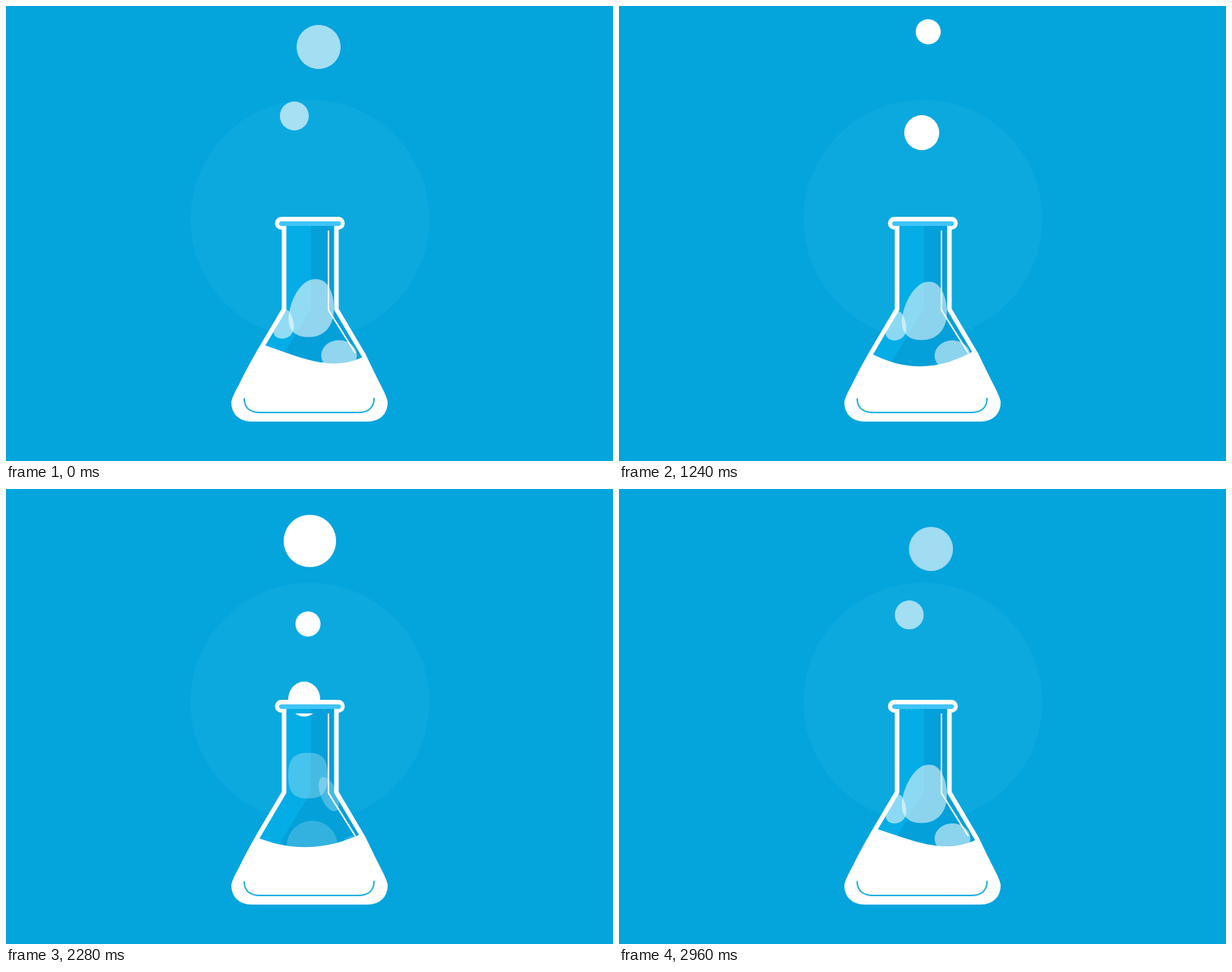
Animation, 800 px wide and 600 px high, one loop 3000 ms. Source, as an HTML page with a canvas:

```html
<!DOCTYPE html>
<html lang="en">
<head>
<meta charset="utf-8">
<title>Bubbling flask</title>
<style>
html, body { margin: 0; width: 100%; height: 100%; overflow: hidden; background: #04a4dd; }
canvas { display: block; }
</style>
</head>
<body>
<canvas id="stage" width="800" height="600"></canvas>
<script>
const ctx = document.getElementById('stage').getContext('2d');
const LOOP = 3000, STEP = 40;
const BLUE = '#04a4dd', LIGHT = '#04ade6', SHADE = '#04a0d9';

const flask = new Path2D('M366.5 290V400L334 455Q318 483 310 500Q300 518 300 523C300 537 310 545 323 545H477C490 545 500 537 500 523Q500 518 490 499Q482 483 471 460L435.5 400V290');
const facet = new Path2D('M366 290H402V400L360 468H325L366 400Z');
const shine = new Path2D('M425 296V401L460 457');
const baseLine = new Path2D('M314 518C314 530 322 536 335 536H464C477 536 485 530 485 517.5');
const bubbleArea = new Path2D('M0 0H800V290H0Z');
bubbleArea.addPath(flask);

// One pose of a bubble at time p
const pose = (p, x, y, rx, ry = rx, taper = 0, lean = 0, square = 2) =>
  [p, x, y, rx, ry, taper, lean, square];

const big = [
  pose(-1080, 403, 510, 33),
  pose(-680, 403.5, 471, 33.5),
  pose(-200, 405, 411, 26.5, 40, .38, 4),
  pose(0, 403.5, 402, 28.5, 38.5, .2, 5, 2.2),
  pose(600, 401, 278.5, 30, 35.5, 0, 0, 2.6),
  pose(1040, 400.5, 68.5, 34.5),
  pose(1220, 400, -40, 34.5)
];
const small = [
  pose(-680, 362, 487, 14),
  pose(-200, 363.5, 433.5, 13.5, 17.5, .35, 2),
  pose(0, 366, 422, 12.5, 19, .4, 3),
  pose(600, 385, 364.5, 14.2, 18.5, -.12, 0, 2.4),
  pose(1040, 398, 178, 16.5),
  pose(1280, 407.5, 34, 16.5),
  pose(1400, 412, -40, 16.5)
];
const medium = [
  pose(-1080, 458, 500, 18),
  pose(-680, 457, 478, 17, 20.5),
  pose(-200, 440, 453, 22.5, 20, .3, 3),
  pose(0, 439.5, 461, 23.5, 20),
  pose(600, 408.5, 399, 21.5, 24, .08),
  pose(1040, 393, 277, 21, 23),
  pose(1280, 399, 167, 23),
  pose(1520, 405.5, 26.5, 22.5),
  pose(1640, 407, -45, 22.5)
];
const orb = [
  pose(-1120, 387, 431.5, 29),
  pose(-720, 398, 378, 26, 30, 0, 0, 2.7),
  pose(-240, 406, 192.5, 29),
  pose(0, 412, 54, 29),
  pose(140, 414, -40, 29)
];
const drop = [
  pose(-1120, 434.5, 447.5, 16),
  pose(-720, 425.5, 402.5, 11.5, 22.5, 0, -7),
  pose(-240, 397, 262, 19),
  pose(0, 380, 145, 19),
  pose(300, 366, -30, 19)
];

// Surface heights: time, left, first handle, second handle, right
const surface = [
  [-240, 452, 464, 483, 460], [0, 444, 458, 486, 462], [560, 452, 460, 476, 463],
  [1240, 457, 483, 481, 452], [1880, 457, 485, 478, 445], [2280, 459, 479, 476, 453]
];
for (const i of [0, 1]) surface.push(surface[i].map((v, j) => j ? v : v + LOOP));

const mod = (a, n) => ((a % n) + n) % n;
const clamp = x => Math.max(0, Math.min(1, x));

// Monotone slope at key i for column c
function slope(keys, i, c) {
  const rate = j => (keys[j][c] - keys[j - 1][c]) / (keys[j][0] - keys[j - 1][0]);
  if (i === 0) return rate(1);
  if (i === keys.length - 1) return rate(i);
  const h0 = keys[i][0] - keys[i - 1][0], h1 = keys[i + 1][0] - keys[i][0];
  const d0 = rate(i), d1 = rate(i + 1);
  if (d0 * d1 <= 0) return 0;
  const m = (d0 * h1 + d1 * h0) / (h0 + h1);
  return Math.sign(m) * Math.min(Math.abs(m), 3 * Math.abs(d0), 3 * Math.abs(d1));
}

function sample(keys, t) {
  const last = keys.length - 1;
  if (t <= keys[0][0]) return keys[0].slice(1);
  if (t >= keys[last][0]) return keys[last].slice(1);
  const i = keys.findIndex(k => k[0] > t) - 1;
  const a = keys[i], b = keys[i + 1], h = b[0] - a[0], u = (t - a[0]) / h;
  const w = u * u * (3 - 2 * u);
  return a.slice(1).map((v, j) => v + (b[j + 1] - v) * w
    + h * u * (1 - u) * ((1 - u) * slope(keys, i, j + 1) - u * slope(keys, i + 1, j + 1)));
}

function blob([x, y, rx, ry, taper, lean, square]) {
  const bend = v => Math.sign(v) * Math.abs(v) ** (2 / square);
  ctx.beginPath();
  for (let i = 0; i < 72; i++) {
    const angle = i * Math.PI / 36, c = bend(Math.cos(angle)), s = bend(Math.sin(angle));
    ctx.lineTo(x + rx * c * (1 + taper * s) - lean * s, y + ry * s);
  }
  ctx.fill();
}

function bubbles(group, t, start, base) {
  const p = mod(t - start + 1300, LOOP) - 1300;
  ctx.globalAlpha = clamp(base + p * .00052);
  for (const keys of group) blob(sample(keys, p));
  ctx.globalAlpha = 1;
}

function stroke(path, color, width) {
  ctx.strokeStyle = color;
  ctx.lineWidth = width;
  ctx.stroke(path);
}

function pill(x, y, w, h, color) {
  ctx.fillStyle = color;
  ctx.beginPath();
  ctx.roundRect(x, y, w, h, h / 2);
  ctx.fill();
}

function box(x, y, w, h, color) {
  ctx.fillStyle = color;
  ctx.fillRect(x, y, w, h);
}

function inside(path, paint) {
  ctx.save();
  ctx.clip(path);
  paint();
  ctx.restore();
}

function liquid(t) {
  const [l, a, b, r] = sample(surface, t);
  ctx.fillStyle = '#fff';
  ctx.beginPath();
  ctx.moveTo(290, 560);
  ctx.lineTo(290, l);
  ctx.lineTo(330, l);
  ctx.bezierCurveTo(378, a, 425, b, 472, r);
  ctx.lineTo(510, r);
  ctx.lineTo(510, 560);
  ctx.fill();
}

function draw(t) {
  box(0, 0, 800, 600, BLUE);
  ctx.fillStyle = '#0ca9df';
  ctx.beginPath();
  ctx.arc(400.5, 281, 157.5, 0, 7);
  ctx.fill();

  ctx.fillStyle = SHADE;
  ctx.fill(flask);
  ctx.fillStyle = LIGHT;
  inside(flask, () => ctx.fill(facet));

  ctx.fillStyle = '#fff';
  inside(bubbleArea, () => {
    bubbles([orb, drop], t, 0, .64);
    bubbles([big, small, medium], t, 2960, .54);
    bubbles([big, small, medium], t, 1240, .54);
  });
  inside(flask, () => liquid(t));

  stroke(flask, '#fff', 6);
  stroke(shine, '#fff', 2);
  stroke(baseLine, '#1caee1', 2);

  pill(354.5, 278, 92, 17, '#fff');
  pill(360, 284, 81.5, 6, '#41c4f8');
  box(369.5, 290, 32.5, 6, LIGHT);
  box(402, 290, 30.5, 6, SHADE);
}

ctx.lineCap = 'round';
ctx.lineJoin = 'round';
const begin = performance.now();
function tick() {
  const ms = (performance.now() - begin) % LOOP;
  draw(Math.floor(ms / STEP) * STEP);
  requestAnimationFrame(tick);
}
tick();
</script>
</body>
</html>
```
